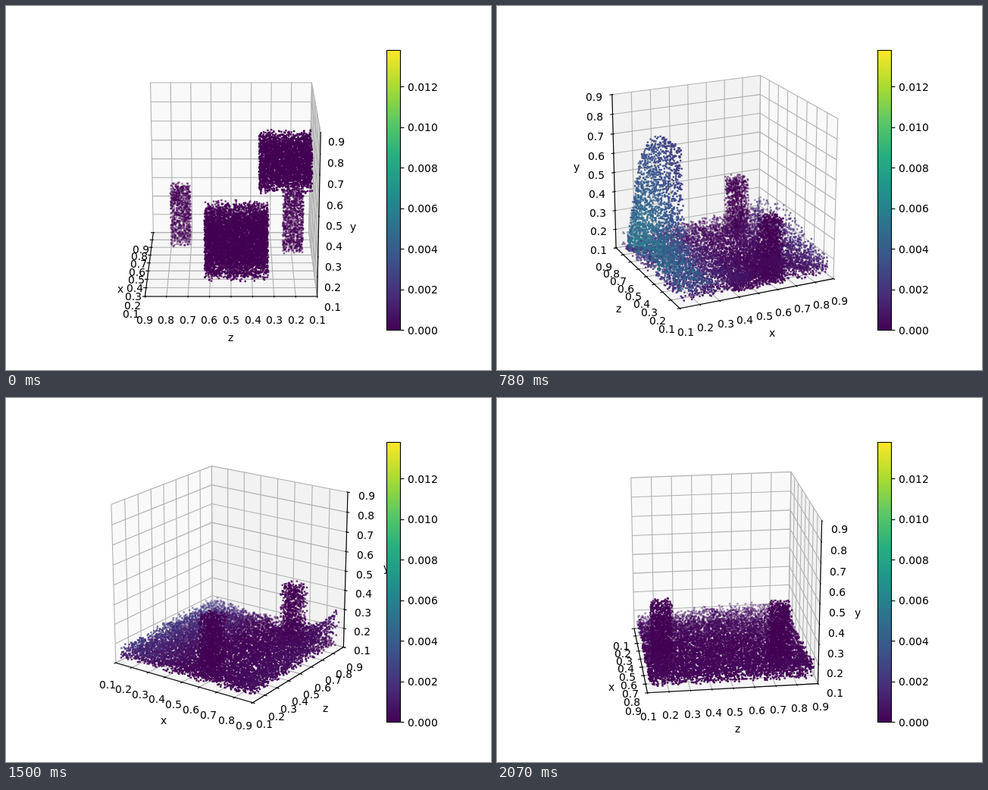
Animation of 640x480 px, one loop 2.1 s. Source, as an HTML page with a canvas:

```html
<!DOCTYPE html>
<html lang="en">
<head>
<meta charset="utf-8">
<title>Particle flow, rotating 3D scatter</title>
<style>
  html, body { margin: 0; width: 100%; height: 100%; overflow: hidden; background: #fff; }
  canvas { display: block; }
</style>
</head>
<body>
<canvas id="stage" width="640" height="480"></canvas>
<script>
const ctx = document.getElementById('stage').getContext('2d');
const STEP = 30, COUNT = 70, DEGREES = 2.5;
const MIN = 0.1, MAX = 0.9, SPEED_MAX = 0.01383;
const LINE = 1.11, DOT = 2.4;

const clamp = (v, a, b) => Math.min(b, Math.max(a, v));
const lerp = (a, b, k) => a + (b - a) * k;
const smooth = v => { v = clamp(v, 0, 1); return v * v * (3 - 2 * v); };

// ---------- camera ----------
const ELEV = 20 * Math.PI / 180, SIN_E = Math.sin(ELEV), COS_E = Math.cos(ELEV);
const CUBE = 1.37532, ZOOM = 1997.8, CX = 297, CY = 237.4;
let sinA = 0, cosA = 1;

function project(p) {
  const x = (p[0] - 0.5) * CUBE, y = (p[1] - 0.5) * CUBE, z = (p[2] - 0.5) * CUBE;
  const near = -x * cosA - z * sinA;
  const depth = 10 - near * COS_E - y * SIN_E;
  return [
    CX + ZOOM * (x * sinA - z * cosA) / depth,
    CY - ZOOM * (y * COS_E - near * SIN_E) / depth,
    depth
  ];
}

// ---------- colours ----------
const VIRIDIS = [
  [68, 1, 84], [71, 45, 123], [59, 82, 139], [44, 114, 142], [33, 145, 140],
  [40, 174, 128], [94, 201, 98], [173, 220, 48], [253, 231, 37]
];
function viridis(f) {
  const p = clamp(f, 0, 1) * 8, i = Math.min(7, Math.floor(p));
  return VIRIDIS[i].map((c, k) => Math.round(lerp(c, VIRIDIS[i + 1][k], p - i)));
}
const palette = Array.from({ length: 256 }, (_, i) => `rgb(${viridis(i / 255)})`);

// ---------- particles ----------
let seed = 20817;
function rand() {
  seed = (seed + 0x6D2B79F5) | 0;
  let t = Math.imul(seed ^ (seed >>> 15), 1 | seed);
  t = (t + Math.imul(t ^ (t >>> 7), 61 | t)) ^ t;
  return ((t ^ (t >>> 14)) >>> 0) / 4294967296;
}

const particles = [];
function addBox(count, lo, hi, extra) {
  for (let i = 0; i < count; i++) {
    const f = [rand(), rand(), rand()];
    particles.push({
      f, start: f.map((v, k) => lerp(lo[k], hi[k], v)),
      r: rand(), s: Math.pow(rand(), 1.25), q: rand(), ...extra(i)
    });
  }
}
const solid = () => ({ solid: true });
addBox(850, [0.65, 0.12, 0.7], [0.75, 0.435, 0.8], solid);
addBox(850, [0.56, 0.12, 0.145], [0.66, 0.435, 0.245], solid);
addBox(6600, [0.2, 0.13, 0.325], [0.5, 0.43, 0.625], i => ({ peak: 0.004, piled: i < 1300 }));
addBox(3300, [0.15, 0.59, 0.13], [0.39, 0.82, 0.37], i => ({ peak: 0.008, sheet: i < 2600 }));

// Flow parameters at a few moments, interpolated in between
const TIMES = [480, 780, 1020, 1500, 1830, 2070];
const FLOW = {
  base:   [0.1, 0.07, 0.07, 0.06, 0.06, 0.06],       // depth of the pool
  reach:  [0.72, 0.885, 0.885, 0.885, 0.885, 0.885], // how far it has spread in z
  wave:   [0.22, 0.16, 0.2, 0.18, 0.1, 0.05],        // swell at the high-x wall
  waveZ:  [0.5, 0.6, 0.85, 0.95, 0.95, 0.9],
  back:   [0.15, 0.03, 0, 0.03, 0.06, 0.06],         // swell at the low-x wall
  pile:   [0.05, 0.08, 0.07, 0, 0, 0],               // heap in front of the near column
  top:    [0.77, 0.74, 0.54, 0.1, 0.07, 0.06],       // sheet climbing the low-x wall
  width:  [0.748, 0.684, 0.75, 1, 1, 1],
  span:   [0.64, 0.68, 0.74, 0.77, 0.77, 0.77],
  merge:  [0, 0, 0, 1, 1, 1],                        // sheet and heap returning to the pool
  left:   [0.0055, 0.0045, 0.0042, 0.0028, 0.0012, 0.0006],
  right:  [0.0042, 0.002, 0.0018, 0.0006, 0.0004, 0.0002],
  fast:   [0.006, 0.0056, 0.0055, 0.002, 0.001, 0.0005],
  fade:   [0.7, 0.45, 0.15, 0, 0, 0]
};
function flowAt(t) {
  let i = 0;
  while (i < TIMES.length - 2 && t > TIMES[i + 1]) i++;
  const k = clamp((t - TIMES[i]) / (TIMES[i + 1] - TIMES[i]), 0, 1);
  return Object.fromEntries(Object.entries(FLOW).map(([n, v]) => [n, lerp(v[i], v[i + 1], k)]));
}

// Fluid touching the floor is held back by friction
const friction = y => clamp((y - 0.115) / 0.06, 0, 1);

function pool(p, w) {
  const early = p.piled
    ? [0.35 + 0.35 * p.q, 0.4 * p.f[2] * p.f[2]]
    : [Math.pow(p.f[0], 0.8), p.f[2]];
  const x = 0.115 + 0.77 * lerp(early[0], p.f[0], w.merge);
  const far = Math.min(0.885, w.reach + 0.1 * x);
  const z = lerp(0.115, far, lerp(early[1], p.f[2], w.merge));
  const wall = Math.exp(-(MAX - x) / 0.08) * Math.exp(-(((z - w.waveZ) / 0.35) ** 2));
  const heap = Math.exp(-(((x - 0.58) / 0.1) ** 2)) * Math.exp(-(z - MIN) / 0.2);
  const rise = w.base + w.wave * wall + w.pile * heap
    + w.back * Math.exp(-(x - MIN) / 0.15) * z * 1.2;
  const y = 0.12 + rise * p.r;
  const c = w.left * clamp(1 - (x - MIN) / 0.4, 0, 1) * lerp(0.5, 1.2, p.q)
    + w.right * Math.exp(-(MAX - x) / 0.15);
  return [x, y, z, c * friction(y) + 0.0002 * p.r];
}

function climb(p, w) {
  const z = 0.112 + p.q * w.span;
  const height = w.top * (1 - ((z - MIN) / w.width) ** 4);
  const x = 0.112 + 0.015 * p.r + 0.2 * p.r * (1 - p.s) ** 4;
  const y = 0.12 + Math.max(0.03, height) * p.s;
  const c = w.fast * (1 - w.fade * p.s) * lerp(0.75, 1.25, p.q);
  return [x, y, z, c * friction(y)];
}

function place(p, t, w) {
  if (p.solid) return [...p.start, 0];
  let now = pool(p, w);
  if (p.sheet) {
    const up = climb(p, w);
    now = now.map((v, k) => lerp(up[k], v, w.merge));
  }
  if (t >= 480) return now;
  const k = smooth((t - 90) / 390), sec = t / 1000;
  const drop = Math.max(0.12 + 0.22 * p.f[1], p.start[1] - 5 * sec * sec);
  const from = [p.start[0], Math.min(p.start[1], drop), p.start[2], 0];
  const out = from.map((v, i) => lerp(v, now[i], k));
  out[3] += p.peak * Math.sin(Math.PI * t / 480);
  return out;
}

function drawParticles(t) {
  const w = flowAt(t);
  const dots = particles.map(p => {
    const at = place(p, t, w), [x, y, d] = project(at);
    return { x, y, d, c: at[3] };
  }).sort((a, b) => b.d - a.d);
  const far = dots[0].d, span = far - dots[dots.length - 1].d;
  for (const o of dots) {
    // face and outline overlap, so a dot is denser than its plain depth shade
    ctx.globalAlpha = 1 - Math.pow(0.7 * (1 - (far - o.d) / span), 1.5);
    ctx.fillStyle = palette[clamp(Math.round(o.c / SPEED_MAX * 255), 0, 255)];
    ctx.fillRect(o.x - DOT / 2, o.y - DOT / 2, DOT, DOT);
  }
  ctx.globalAlpha = 1;
}

// ---------- axes ----------
const NAMES = ['x', 'y', 'z'];
const PANES = ['#f9f9f9', '#f5f5f5', '#f2f2f2'];
const TICK_DIR = [2, 0, 0];
const TICKS = Array.from({ length: 9 }, (_, i) => (i + 1) / 10);
const others = i => [0, 1, 2].filter(k => k !== i);
const withAt = (p, i, v) => p.map((c, k) => k === i ? v : c);
const outward = (p, i, by) => withAt(p, i, p[i] + (p[i] > 0.5 ? by : -by));

function path(points, color, fill) {
  ctx.beginPath();
  points.forEach(p => { const [x, y] = project(p); ctx.lineTo(x, y); });
  ctx.strokeStyle = color;
  if (fill) { ctx.fillStyle = color; ctx.fill(); }
  else ctx.stroke();
}

function text(s, x, baseline) {
  ctx.fillStyle = '#000';
  ctx.fillText(s, Math.round(x - ctx.measureText(s).width / 2), Math.round(baseline));
}

function drawAxes() {
  const highX = cosA > 1e-9, highZ = sinA > 1e-9;
  const far = [highX ? MAX : MIN, MIN, highZ ? MAX : MIN];
  const near = far.map(v => MIN + MAX - v);
  const edges = [
    [0, far[1], near[2]],
    [near[0], 0, far[2]],
    [near[0], far[1], 0]
  ];
  ctx.lineWidth = LINE;

  for (const i of [0, 2, 1]) {
    const [j, k] = others(i), a = withAt(far, j, near[j]);
    path([far, a, withAt(a, k, near[k]), withAt(far, k, near[k])], PANES[i], true);
  }
  for (const i of [0, 2, 1]) {
    const [j, k] = others(i);
    for (const v of TICKS) {
      const p = withAt(far, i, v);
      path([withAt(p, j, near[j]), p, withAt(p, k, near[k])], '#b0b0b0');
    }
  }
  edges.forEach((edge, i) => {
    const push = (p, by) => others(i).reduce((q, k) => outward(q, k, by), p);
    path([withAt(edge, i, MIN), withAt(edge, i, MAX)], '#000');
    for (const v of TICKS) {
      const p = withAt(edge, i, v), d = TICK_DIR[i];
      path([outward(p, d, 0.0128), outward(p, d, -0.0064)], '#000');
      const [x, y] = project(push(p, 0.0664));
      text(v.toFixed(1), x, y + 11);
    }
    const [x, y] = project(push(withAt(edge, i, 0.5), 0.1443));
    text(NAMES[i], x, y + 4);
  });
}

function drawColorbar() {
  const x = 502, y = 58, w = 18, h = 369.5;
  const ramp = ctx.createLinearGradient(0, y + h, 0, y);
  VIRIDIS.forEach((c, i) => ramp.addColorStop(i / 8, `rgb(${c})`));
  ctx.fillStyle = ramp;
  ctx.fillRect(x, y, w, h);
  ctx.strokeStyle = '#000';
  ctx.lineWidth = LINE;
  ctx.strokeRect(x + 0.5, y + 0.5, w, h - 0.5);
  ctx.fillStyle = '#000';
  for (let i = 0; i <= 6; i++) {
    const value = 427.2 - 53.45 * i, ty = Math.round(value) + 0.5;
    ctx.beginPath();
    ctx.moveTo(x + w + 0.5, ty);
    ctx.lineTo(x + w + 5.4, ty);
    ctx.stroke();
    ctx.fillText((i * 0.002).toFixed(3), 530, Math.round(value + 5.5));
  }
}

// ---------- loop ----------
let shown = -1;
function draw(frame) {
  const angle = frame * DEGREES * Math.PI / 180;
  sinA = Math.sin(angle);
  cosA = Math.cos(angle);
  ctx.fillStyle = '#fff';
  ctx.fillRect(0, 0, 640, 480);
  ctx.font = '13.89px "DejaVu Sans", sans-serif';
  drawAxes();
  drawParticles(frame * STEP);
  drawColorbar();
}

const begin = performance.now();
function tick() {
  const frame = Math.floor(Math.max(0, performance.now() - begin) / STEP) % COUNT;
  if (frame !== shown) draw(shown = frame);
  requestAnimationFrame(tick);
}
tick();
</script>
</body>
</html>
```
